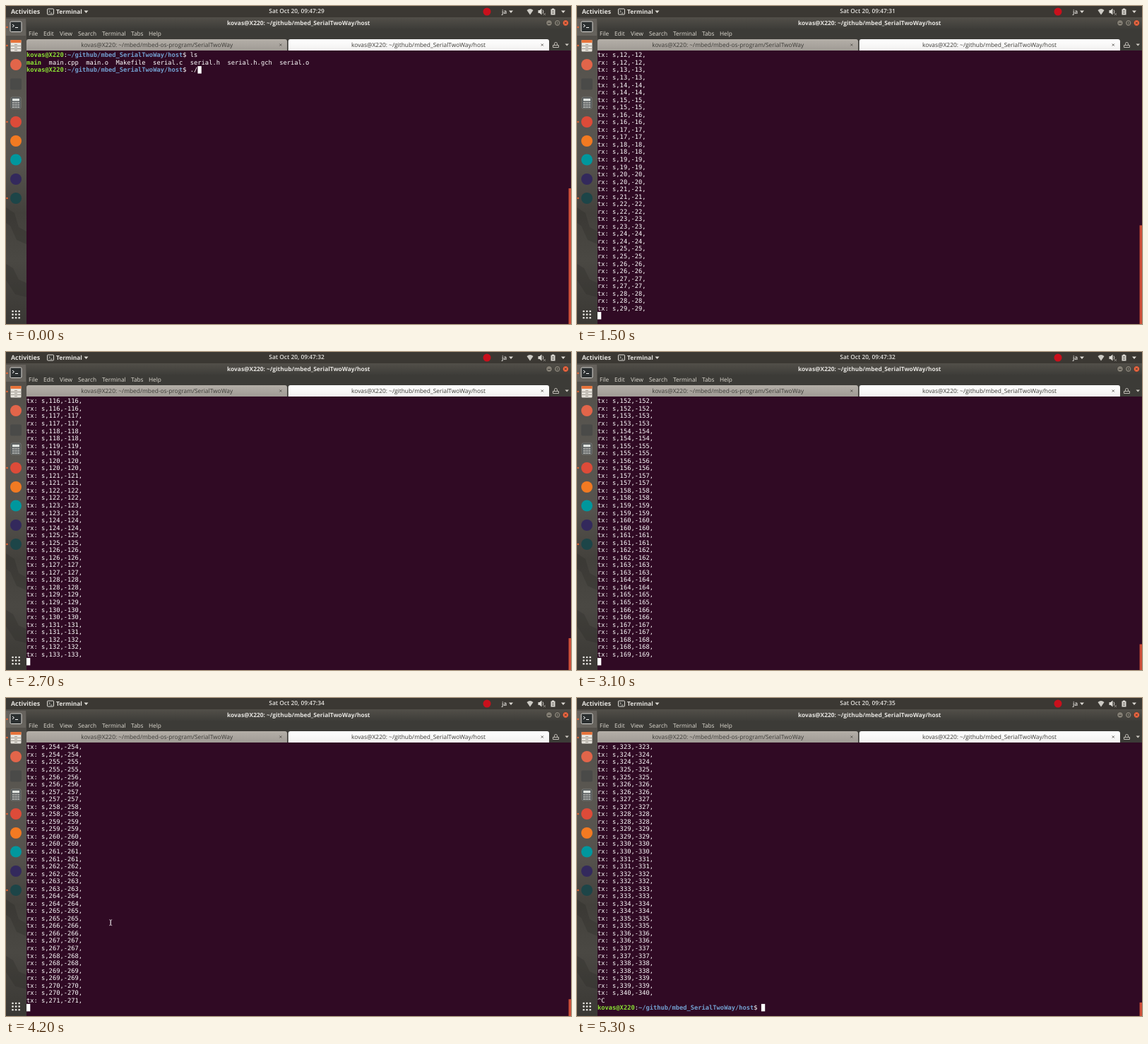
Recreate the animation shown at these times as an HTML page. Size 800x450 px, loop 5.4 s.

```html
<!DOCTYPE html>
<html lang="en">
<head>
<meta charset="utf-8">
<title>Terminal session</title>
<style>
  html, body { margin: 0; width: 100%; height: 100%; overflow: hidden; background: #300a24; }
  svg { display: block; width: 800px; height: 450px; }
  text { white-space: pre; text-rendering: geometricPrecision; }
  .ui { font: 8.3px "Open Sans", "Noto Sans", sans-serif; fill: #dfdbd2; }
  .bar { font-weight: 600; font-size: 8.4px; fill: #e6e4e0; }
  .bold { font-weight: 700; }
  .mid { text-anchor: middle; }
  .tab { fill: #3c3b37; font-size: 8.4px; }
  #activities { font-size: 8.9px; }
  #term { font: 8.755px "DejaVu Sans Mono", monospace; fill: #fff; }
  .user { fill: #8ae234; font-weight: bold; }
  .path { fill: #729fcf; font-weight: bold; }
</style>
</head>
<body>
<svg viewBox="0 0 800 450">
  <defs>
    <linearGradient id="dock" x2="0" y2="1">
      <stop offset="0" stop-color="#4f4c47"/>
      <stop offset=".3" stop-color="#5a5751"/>
      <stop offset=".5" stop-color="#55524d"/>
      <stop offset=".65" stop-color="#43413c"/>
      <stop offset=".8" stop-color="#4a4843"/>
      <stop offset="1" stop-color="#3a3834"/>
    </linearGradient>
    <linearGradient id="titlebar" x2="0" y2="1">
      <stop offset="0" stop-color="#524f49"/>
      <stop offset="1" stop-color="#3e3d39"/>
    </linearGradient>
    <linearGradient id="idle" x2="0" y2="1">
      <stop offset="0" stop-color="#b4afa8"/>
      <stop offset="1" stop-color="#a09b95"/>
    </linearGradient>
    <linearGradient id="active" x2="0" y2="1">
      <stop offset="0" stop-color="#fff"/>
      <stop offset="1" stop-color="#f2f1f0"/>
    </linearGradient>
  </defs>

  <rect width="800" height="450" fill="#300a24"/>
  <rect width="29" height="450" fill="url(#dock)"/>
  <g fill="#2c2b28" opacity=".3">
    <path d="M0 285l12 8 6 20 11 6v18l-14-6-9-20-6-4z"/>
    <path d="M0 365l10 6 8 16 11 5v20l-16-4-13-20z"/>
  </g>

  <!-- top bar -->
  <rect width="800" height="16" fill="#3b3833"/>
  <g class="ui bar">
    <text id="activities" class="bold" x="7" y="11">Activities</text>
    <text class="bold" x="71" y="11">Terminal</text>
    <text id="clock" class="mid" x="411.5" y="10.4"></text>
    <text x="702" y="11">ja</text>
  </g>
  <rect x="58.5" y="4" width="9" height="8" rx="1" fill="#3a3935" stroke="#dedbd5"/>
  <path d="M60.5 6l1.8 1.6-1.8 1.6M63 10h2.5" fill="none" stroke="#dedbd5" stroke-width=".8"/>
  <circle cx="681" cy="8" r="5.5" fill="#c9101c"/>
  <g fill="#dedbd5">
    <path d="M110.5 6.5h6l-3 3.5zM712 6.5h6l-3 3.5zM786 6.5h6l-3 3.5z"/>
    <path d="M737.5 6q4.5-4 9 0l-4.5 6.5z" opacity=".9"/>
    <path d="M753.5 6h2l3-2.5v9l-3-2.5h-2z"/>
    <path d="M771.5 4.5h1.5v-1h3v1h1.5v8h-6z"/>
  </g>
  <path d="M760 5.5q2 2.5 0 5" fill="none" stroke="#dedbd5" stroke-width=".9"/>
  <path d="M761 10l3 3m0-3l-3 3" stroke="#aaa69f" stroke-width=".8"/>
  <path d="M773 6.5h3M773 8.5h3M773 10.5h3" stroke="#3b3833" stroke-width=".7"/>

  <!-- window frame -->
  <rect x="29" y="16" width="771" height="16" fill="url(#titlebar)"/>
  <rect x="29" y="32" width="771" height="31" fill="#3c3b37"/>
  <text id="title" class="ui bar bold mid" x="414.3" y="27"></text>
  <g stroke="#33312d" stroke-width=".6">
    <circle cx="769" cy="24" r="4.2" fill="#858076"/>
    <circle cx="780.7" cy="24" r="4.2" fill="#858076"/>
    <circle cx="792.4" cy="24" r="4.2" fill="#ee6640"/>
  </g>
  <g fill="none" stroke="#32302c" stroke-width=".9">
    <path d="M767.2 24.5h3.6M790.9 22.5l3 3m0-3l-3 3"/>
    <rect x="779.2" y="22.6" width="3" height="2.8"/>
  </g>
  <g class="ui" id="menu"></g>

  <!-- tabs -->
  <path d="M29 63V50q0-3 3-3H395q3 0 3 3v13z" fill="url(#idle)"/>
  <path d="M399.7 63V50q0-3 3-3H766q3 0 3 3v13z" fill="url(#active)"/>
  <text class="ui tab mid" x="213.7" y="58.3" id="tab1"></text>
  <text class="ui tab mid" x="584" y="58.3" id="tab2"></text>
  <path d="M387.3 53.5l3 3m0-3l-3 3M757.8 53.5l3 3m0-3l-3 3" stroke="#55534e" stroke-width=".9"/>
  <path d="M774.5 58.5v-3h8v3zM776.5 55v-1.5a2 2 0 0 1 4 0V55" fill="none" stroke="#d0ccc4" stroke-width=".9"/>
  <path d="M791.5 53.5h5.5l-2.75 3z" fill="#d0ccc4"/>

  <!-- launcher -->
  <rect y="18" width="28" height="24" fill="#8c8882" opacity=".35"/>
  <rect x="6" y="22" width="16" height="14.5" rx="1.5" fill="#2b2f30" stroke="#d8d6d2"/>
  <path d="M9 26l2.5 2-2.5 2M13 30.5h4" fill="none" stroke="#fff"/>
  <rect x="6.5" y="48" width="15" height="16.5" rx="1" fill="#e7e3dc"/>
  <rect x="6.5" y="48" width="15" height="4" fill="#e8743b"/>
  <path d="M7 56.5h14M7 60.5h14M12 54.5h4M12 58.5h4M12 62.5h4" stroke="#9a958c" stroke-width=".9"/>
  <rect x="6" y="102.5" width="16" height="16" rx="2" fill="#4a4a48"/>
  <rect x="7" y="129" width="14" height="16" rx="1.5" fill="#55595a" stroke="#8c8e8c" stroke-width=".6"/>
  <rect x="9" y="131" width="10" height="3.5" fill="#dfe3df"/>
  <path d="M9 137h10M9 140h10M9 143h10" stroke="#d6d6d2" stroke-width="1.7" stroke-dasharray="2 .7"/>
  <g id="apps"></g>
  <g id="dots" fill="#eceae6"></g>
  <g fill="#ee6532">
    <circle cx="1.5" cy="30" r="1.2"/><circle cx="1.5" cy="56" r="1.2"/>
    <circle cx="1.5" cy="164" r="1.2"/><circle cx="1.5" cy="272" r="1.2"/>
  </g>

  <g id="term"></g>
  <rect id="caret" width="5.3" height="10.5" fill="#fff"/>
  <rect id="thumb" x="796.6" width="3.4" fill="#cb4e38"/>
  <path id="beam" d="M146.2 313.8q2 0 2 1v6q0 1-2 1m4-8q-2 0-2 1v6q0 1 2 1" fill="none" stroke="#e8e4e6" stroke-width=".8"/>
</svg>

<script>
const LOOP = 5400, STEP = 100, ROWS = 36;
const LEFT = 29, TOP = 64, CHAR = 5.271, LINE = 10.54;
const HISTORY = 72, PANE = [66, 450];
const ENTER = 1000, STOP = 5000, LAST = 340;

const $ = id => document.getElementById(id);
const host = 'kovas@X220';
const dir = '~/github/mbed_SerialTwoWay/host';
const prompt = `<tspan class="user">${host}</tspan>:<tspan class="path">${dir}</tspan>$ `;
const promptLen = `${host}:${dir}$ `.length;

$('title').textContent = $('tab2').textContent = `${host}: ${dir}`;
$('tab1').textContent = `${host}: ~/mbed/mbed-os-program/SerialTwoWay`;
$('menu').innerHTML = [['File', 32], ['Edit', 53], ['View', 76], ['Search', 102],
  ['Terminal', 136], ['Tabs', 177], ['Help', 202]]
  .map(([s, x]) => `<text x="${x}" y="42.4">${s}</text>`).join('');
$('apps').innerHTML = [[83, '#e2654a'], [164, '#dd4b39'], [191, '#f27a22'],
  [217.5, '#00979d'], [245, '#33295c'], [272, '#1d4548']]
  .map(([y, c]) => `<circle cx="14" cy="${y}" r="8" fill="${c}"/>`).join('');
$('dots').innerHTML = Array.from({ length: 9 }, (_, i) =>
  `<circle cx="${9.5 + i % 3 * 4.6}" cy="${432 + (i / 3 | 0) * 4.6}" r="1.3"/>`).join('');
$('term').innerHTML = Array.from({ length: ROWS }, (_, i) =>
  `<text x="${LEFT}" y="${TOP + 8.4 + i * LINE}"></text>`).join('');
const rows = [...$('term').children];

const typed = t => t < 200 ? './' : t < 300 ? './m' : t < 500 ? './ma' : './main ';

// Index of the newest message; the rate rises slightly over time.
function counter(t) {
  const d = t - 1500;
  return Math.min(LAST, Math.floor(29.05 + .0848 * d + 1.8e-6 * d * d));
}

function session(t) {
  const cmd = typed(t);
  const lines = [
    prompt + 'ls',
    '<tspan class="user">main</tspan>  main.cpp  main.o  Makefile  serial.c  serial.h  serial.h.gch  serial.o',
    prompt + cmd
  ];
  if (t < ENTER) return { lines, col: promptLen + cmd.length };
  const n = counter(t);
  for (let i = 0; i <= n; i++) {
    lines.push(`tx: s,${i},-${i},`);
    if (i < n) lines.push(`rx: s,${i},-${i},`);
  }
  const done = t >= STOP;
  if (done) lines.push('^C');
  lines.push(done ? prompt : '');
  return { lines, col: done ? promptLen : 0 };
}

function draw(t) {
  const { lines, col } = session(t);
  const hidden = Math.max(0, lines.length - ROWS);
  const view = lines.slice(hidden);
  rows.forEach((row, i) => row.innerHTML = view[i] || '');
  $('caret').setAttribute('x', LEFT + col * CHAR);
  $('caret').setAttribute('y', TOP + (view.length - 1) * LINE);

  const size = (PANE[1] - PANE[0]) * ROWS / (HISTORY + hidden);
  $('thumb').setAttribute('y', PANE[1] - size);
  $('thumb').setAttribute('height', size);

  $('clock').textContent = `Sat Oct 20, 09:47:${29 + Math.floor((t + 400) / 900)}`;
  $('beam').style.display = t >= 4100 && t < STOP ? '' : 'none';
}

let shown = -1;
function tick(now) {
  const t = Math.floor(now % LOOP / STEP) * STEP;
  if (t !== shown) draw(shown = t);
  requestAnimationFrame(tick);
}
draw(0);
requestAnimationFrame(tick);
</script>
</body>
</html>
```
